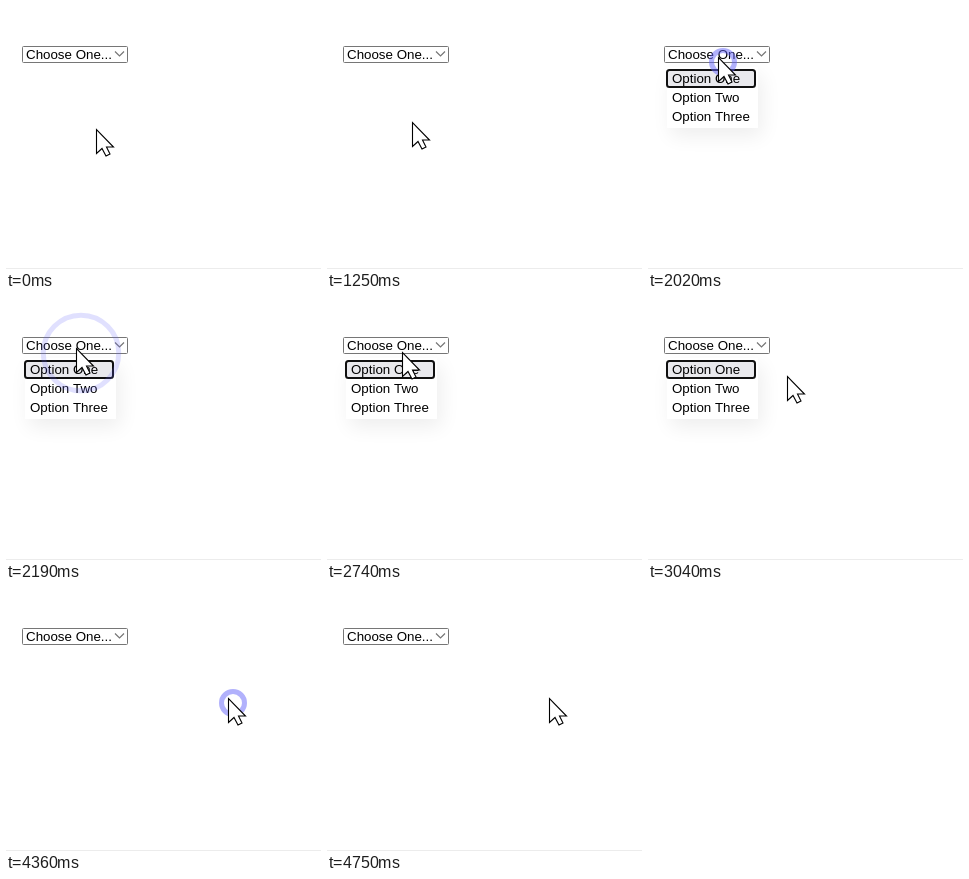
These frames come from a looping animation (315x263 px, 5470 ms). An HTML page with a canvas:

```html
<!DOCTYPE html>
<html lang="en">
<head>
<meta charset="utf-8">
<title>Select menu</title>
<style>
  html, body { margin: 0; width: 100%; height: 100%; overflow: hidden; background: #fff; }
  canvas { display: block; width: 315px; height: 263px; }
</style>
</head>
<body>
<canvas id="stage"></canvas>
<script>
const W = 315, H = 263, LOOP = 5470;
const canvas = document.getElementById('stage');
const ctx = canvas.getContext('2d');
const dpr = window.devicePixelRatio || 1;
canvas.width = W * dpr;
canvas.height = H * dpr;
ctx.scale(dpr, dpr);

const OPTIONS = ['Option One', 'Option Two', 'Option Three'];
const ARROW = [[0, 0], [0, 24], [5.5, 19], [9.5, 26.5], [13.5, 24.5], [10, 17.5], [17, 17.5]];

// Index of the current step when [start, end] is split into n equal steps.
const stepAt = (t, start, end, n) =>
  Math.min(n, Math.floor((t - start) / (end - start) * n + 1e-6));
const smooth = u => u * u * (3 - 2 * u);
const mix = (a, b, u) => Math.round(a + (b - a) * u);

function cursorAt(t) {
  if (t < 150) return [90, 123];
  if (t < 1250) return [90, 121];
  if (t < 2740) {
    const u = smooth(stepAt(t, 1250, 1640, 5) / 5);
    return [mix(85, 70, 1 - (1 - u) ** 1.3), mix(116, 51, u)];
  }
  const u = stepAt(t, 2740, 3430, 9) / 9;
  const e = smooth(1 - (1 - u) ** 1.5);
  return [mix(75, 222, e), mix(55, 110, e)];
}

function text(s, x, y) {
  ctx.font = '13.333px "Liberation Sans", Arial, sans-serif';
  ctx.fillStyle = '#000';
  ctx.fillText(s, x, y);
}

function polyline(points, color, width) {
  ctx.beginPath();
  points.forEach(([x, y]) => ctx.lineTo(x, y));
  ctx.strokeStyle = color;
  ctx.lineWidth = width;
  ctx.stroke();
}

function drawSelect() {
  ctx.beginPath();
  ctx.roundRect(16.5, 40.5, 105, 16, 1);
  ctx.strokeStyle = '#767676';
  ctx.lineWidth = 1;
  ctx.stroke();
  text('Choose One...', 20, 53);
  polyline([[109, 45.5], [113.5, 50], [118, 45.5]], '#767676', 1.2);
}

function drawMenu([cx, cy]) {
  ctx.save();
  ctx.shadowColor = 'rgba(0,0,0,.07)';
  ctx.shadowBlur = 20 * dpr;
  ctx.shadowOffsetX = 4 * dpr;
  ctx.shadowOffsetY = 8 * dpr;
  ctx.fillStyle = '#fff';
  ctx.fillRect(19, 61, 91, 61);
  ctx.restore();

  const hover = cx > 18 && cx < 110 && cy > 62 && cy < 82;
  ctx.beginPath();
  ctx.roundRect(19, 64, 88, 17, 2.5);
  ctx.fillStyle = hover ? '#dfdfe3' : '#e9e9ed';
  ctx.fill();
  ctx.strokeStyle = '#101010';
  ctx.lineWidth = 2;
  ctx.stroke();
  OPTIONS.forEach((s, i) => text(s, 24, 77 + 19 * i));
}

// Click ripple: grows and fades by a fixed amount per step.
function drawRipple([cx, cy], step) {
  ctx.beginPath();
  ctx.arc(cx + 5, cy + 5, 11.5 + 8.75 * step, 0, Math.PI * 2);
  ctx.strokeStyle = `rgba(100,100,250,${0.5 - 0.1 * Math.max(0, step)})`;
  ctx.lineWidth = 5;
  ctx.stroke();
}

function drawCursor([x, y]) {
  ctx.save();
  ctx.translate(x + 0.5, y + 0.5);
  ctx.beginPath();
  ARROW.forEach(p => ctx.lineTo(...p));
  ctx.closePath();
  ctx.fillStyle = '#fff';
  ctx.fill();
  ctx.strokeStyle = '#000';
  ctx.lineWidth = 1.1;
  ctx.stroke();
  ctx.restore();
}

function draw(t) {
  const cursor = cursorAt(t);
  ctx.fillStyle = '#fff';
  ctx.fillRect(0, 0, W, H);
  ctx.fillStyle = '#ececec';
  ctx.fillRect(0, 262, W, 1);

  drawSelect();
  if (t >= 1948 && t < 4360) drawMenu(cursor);
  if (t >= 1870 && t < 2340) drawRipple(cursor, stepAt(t, 1870, 2340, 6) - 1);
  if (t >= 4360 && t < 4750) drawRipple(cursor, stepAt(t, 4360, 4750, 5));
  drawCursor(cursor);
}

const origin = performance.now();
function tick() {
  draw((performance.now() - origin) % LOOP);
  requestAnimationFrame(tick);
}
tick();
</script>
</body>
</html>
```
